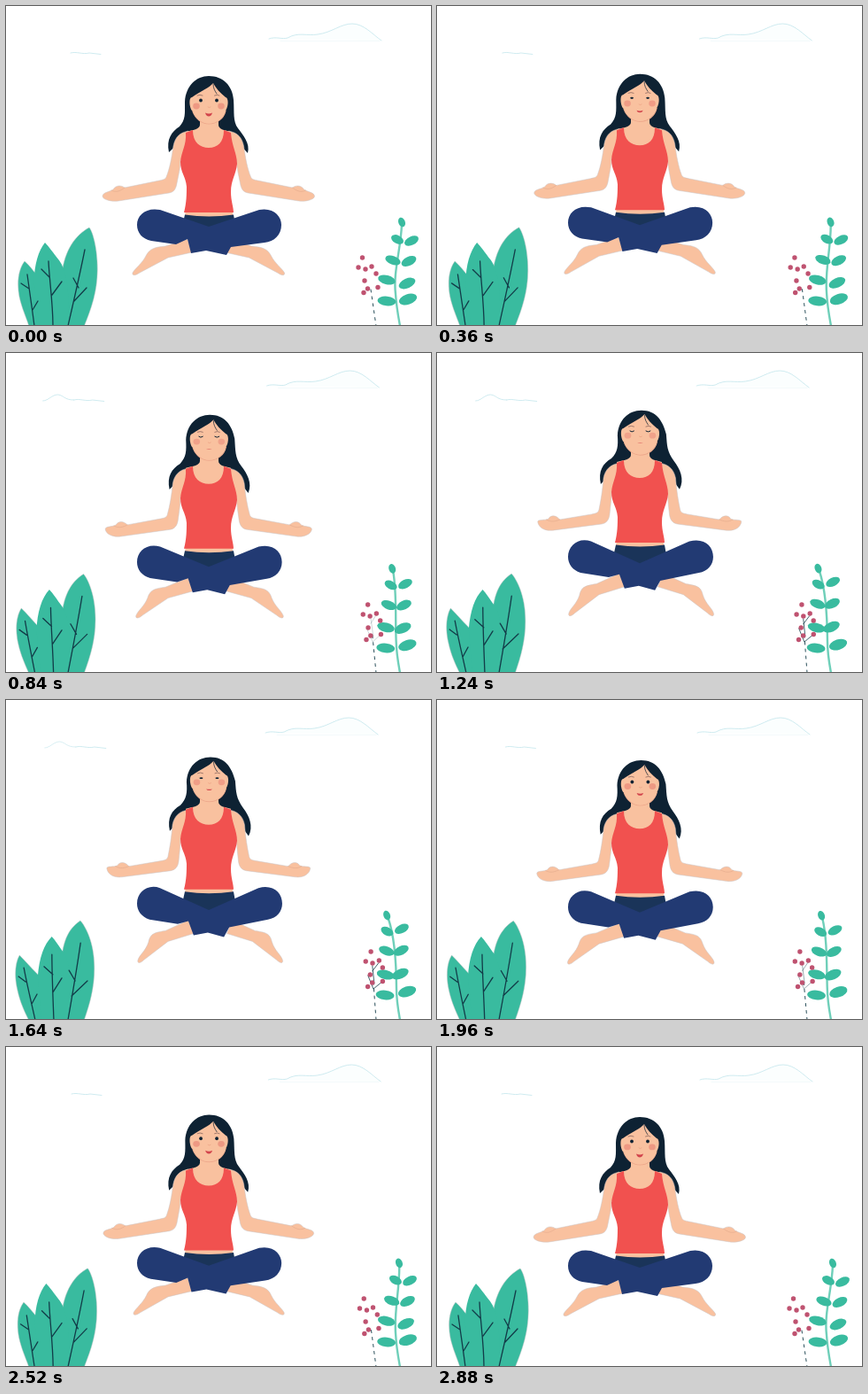
Recreate the animation shown at these times as an HTML page. Size 480 by 360 pixels, loop 2.92 s.

```html
<!DOCTYPE html>
<html lang="en">
<head>
<meta charset="utf-8">
<title>Floating meditation</title>
<style>
html, body { margin: 0; width: 100%; height: 100%; overflow: hidden; background: #fff; }
svg { display: block; width: 480px; height: 360px; }
</style>
</head>
<body>
<svg id="stage" viewBox="0 0 480 360"></svg>
<script>
const LOOP = 2920, STEP = 40;
const SKIN = '#f9c19f', HAIR = '#0e2233', RED = '#f1514f', PANTS = '#223a73',
  WAIST = '#1a3459', LEAF = '#39bb9f', VEIN = '#123c48', BERRY = '#bf5270', MIST = '#c3e6ec';
const stage = document.getElementById('stage');
const movers = [];

function add(tag, attrs, parent = stage) {
  const el = document.createElementNS('http://www.w3.org/2000/svg', tag);
  for (const k in attrs) el.setAttribute(k, attrs[k]);
  parent.appendChild(el);
  return el;
}
const group = (parent = stage) => add('g', {}, parent);
const mix = (a, b, p) => a + (b - a) * p;
const ramp = (t, a, b) => Math.min(1, Math.max(0, (t - a) / (b - a)));

// Path blending from its low pose to its high pose
function morph(low, high, attrs, parent) {
  const el = add('path', attrs, parent);
  const end = high.match(/-?[\d.]+/g).map(Number);
  movers.push(p => {
    let i = 0;
    el.setAttribute('d', low.replace(/-?[\d.]+/g, n => mix(+n, end[i++], p).toFixed(2)));
  });
  return el;
}
// Group sliding by (dx, dy) between the poses
function slide(dx, dy, parent) {
  const g = group(parent);
  movers.push(p => g.setAttribute('transform', `translate(${dx * p} ${dy * p})`));
  return g;
}
function mirrored() {
  return add('g', { transform: 'translate(457.5 0) scale(-1 1)' });
}
const fill = color => ({ fill: color });
const edged = color => ({ fill: color, stroke: '#c9c5c6', 'stroke-width': .5 });
const line = (color, width) => ({ fill: 'none', stroke: color, 'stroke-width': width,
  'stroke-linecap': 'round', 'stroke-linejoin': 'round' });

// Clouds
const farCloud = slide(-4, 0);
add('path', { d: 'M297 37C305 34 312 38 318 36C330 29 340 34 352 32C368 30 378 20 391 20C404 20 414 32 424 39Z', fill: '#fbfefe' }, farCloud);
add('path', { d: 'M297 37C305 34 312 38 318 36C330 29 340 34 352 32C368 30 378 20 391 20C404 20 414 32 424 39', ...line(MIST, .8) }, farCloud);
add('path', { d: 'M310 39.5H422', ...line('#eef8f9', .7) }, farCloud);
const nearCloud = slide(6, 0);
add('path', { d: 'M73 53C80 51 86 55 94 53L107 54.5', ...line(MIST, .8) }, nearCloud);
const cloudTail = add('path', { d: 'M38 54C44 54 48 47 55 47C62 48 62 53 73 53', ...line(MIST, .8) }, nearCloud);

// Broad leaves
morph('M94 250C79 258 66 275 63 303L60 362L88 362C96 342 105 320 103 288C102 268 97 253 94 250Z',
  'M83.500 249C69 259 63 274 62 303L58 362L88 362C95 342 102 318 99 290C97 268 87 252 83.500 249Z', edged(LEAF));
morph('M21 288C14 297 12 312 15 328C18 342 24 354 26 362L50 362C48 335 42 312 36 305C31 299 26 292 21 288Z',
  'M15 288C10 297 9 312 13 328C16 342 22 354 26 362L52 362C48 338 42 316 35 309C28 302 21 294 15 288Z', edged(LEAF));
morph('M44 267C36 277 31 295 32 315L38 362L70 362C72 330 70 300 60 287C53 278 48 271 44 267Z',
  'M52 267C43 276 38 290 36 312L40 362L72 362C76 330 74 300 66 286C60 278 56 271 52 267Z', fill(LEAF));
morph('M89 275C83 305 76 335 70 361M76 307L82 318M91 318L77 333',
  'M84 274C80 303 75 332 70 361M71 305L78 317M92 317L74 334', line(VEIN, 1.3));
morph('M48 288C49 310 53 335 53 361M40 297L49 306M63 311L52 326',
  'M52 287C52 310 53 335 54 361M43 301L53 310M63 314L53 330', line(VEIN, 1.3));
morph('M24 303C27 325 30 345 32 361M17 313L26 319M36 333L30 343',
  'M20 302C24 323 29 343 33 361M14 312L22 318M35 332L29 343', line(VEIN, 1.3));

// Sprig: low x, y, high x, y, half length, half width, tilt
morph('M447 246C446 275 437 300 440 325C441 340 443 350 445 361',
  'M431 246C439 268 441 298 441 325C441 340 443 350 445 361', line('#6fcfb9', 2.4));
[
  [447, 244, 429.5, 243, 5.5, 3.8, 70],
  [442, 263.5, 430, 261, 7.5, 4.6, 28], [458, 265, 446.5, 258, 8.5, 4.8, -26],
  [437, 287, 429.5, 283, 9, 4.9, 20], [455, 288, 446, 282.5, 9, 5, -26],
  [430, 309, 428.5, 310, 10, 5.2, 14], [453, 313, 445, 309, 10, 5.4, -24],
  [430, 333, 428, 333, 10.5, 5.4, 6], [454, 331, 453, 329, 10.5, 5.8, -18]
].forEach(([x, y, x2, y2, rx, ry, tilt]) => {
  const el = add('ellipse', { rx, ry, fill: LEAF });
  movers.push(p => el.setAttribute('transform',
    `translate(${mix(x, x2, p)} ${mix(y, y2, p)}) rotate(${tilt})`));
});

// Berries lean more the higher they sit
const lean = (y, p) => p * 10 * (360 - y) / 76;
morph('M412 320L418 361', 'M415 318L418 361', { ...line(VEIN, .9), 'stroke-dasharray': '3 5' });
const twigs = morph('M404 309L413 326L420 317M409 300L413 320M413 294L409 304',
  'M409 311L415 326L425 318M414 300L416 320M421 297L414 306', line(VEIN, .8));
[[402.5, 284], [398, 295], [406, 297], [413, 294], [418, 302], [405, 310],
  [408.5, 319], [404, 323.5], [420, 317.5]].forEach(([x, y]) => {
  const el = add('circle', { cy: y, r: 2.7, fill: BERRY });
  movers.push(p => el.setAttribute('cx', x + lean(y, p)));
});

// Hair
morph('M229 79C215 79 203 90 202 108C202 122 203 128 196 136C187 142 181 150 184 165L200 150L258 150L273 166C276 155 268 146 262 138C256 130 258 120 257 106C256 90 245 79 229 79Z',
  'M231 64C216 64 205 75 204 92C205 104 204 111 197 118C187 124 182 132 185 147L200 131L258 131L274 153C280 142 275 130 268 121C260 110 260 104 259 91C255 75 247 64 231 64Z', fill(HAIR));

// Feet and arms, drawn once and mirrored; the far foot swings in less
const sides = [group(), mirrored()];
sides.forEach((side, far) => {
  morph('M205 263L180 271C168 272 162 274 158 282C154 290 146 296 143 301C142 305 147 304 151 301L183 284L210 278Z',
    'M206 248L180 260C166 262 163 264 161 273C158 283 150 288 149 294C149 298 153 296 156 293L183 272L212 263Z',
    edged(SKIN), slide(-4 * far, 0, side));
  morph('M206 141C196 143 191 148 189 158C187 172 185 183 181 193C180 196 177 196 173 197L134 205C130 202 124 202 121 207C117 210 109 210 109 215C110 219 120 221 127 220L184 211C190 210 192 206 193 200C195 190 197 182 197 174L210 170Z',
    'M206 123C196 125 190 130 188 140C187 154 185 166 183 176C182 180 179 180 175 181L139 187C135 182 129 181 126 186C122 188 114 186 114 189C115 196 122 200 131 199L186 192C191 191 194 188 195 182C196 172 197 164 197 155L210 150Z', edged(SKIN), side);
  morph('M119 208C124 211 129 209 134 205', 'M124 187C129 190 134 189 139 187', line('#e3aa8b', .6), side);
});

// Torso
const torso = slide(0, -20);
add('path', { d: 'M219 124V134C219 139 211 140 203 142L207 170H251L254 142C246 140 240 139 240 134V124Z', ...fill(SKIN) }, torso);
add('path', { d: 'M203 228H256V238H202Z', ...fill(SKIN) }, torso);
add('path', { d: 'M203 143L211 140C211 154 219 160 229 160C239 160 246 154 246 140L254 143C255 158 261 167 261 178C260 190 254 196 254 210C254 220 257 227 257 233H201C204 222 204 212 204 204C203 192 197 188 197 176C198 164 204 157 203 143Z', ...fill(RED) }, torso);
add('path', { d: 'M202 235.500Q229 239.500 257 235.500L261 258H197Z', ...fill(WAIST) }, torso);

// Legs
morph('M174 230L229 249L286 230C302 227 311 237 311 247C311 258 303 266 292 267L254 272L249 281L226 276L209 279L205 263L192 269L164 265C154 263 148 256 148 247C148 236 158 227 174 230Z',
  'M174 211.500L229 236.500L285 211.500C302 207 312 217 312 229C312 238 306 245 296 247L252 256L246 267L228 262L212 265L206 249L194 252L162 247C153 244 148 237 148 229C148 216 160 206.500 174 211.500Z', fill(PANTS));

// Face
const head = slide(.5, -19);
add('path', { d: 'M211 119C214 127 221 133 229 133C238 133 246 127 248 118', ...line('#eeaa8d', 1.2) }, head);
add('path', { d: 'M234 87C230 92 220 96 210 103C206 103 207 116 211 119C214 127 221 132.5 229 132.5C238 132.5 246 127 248 118C252 112 251 103 248 103C242 98 237 93 234 87Z', ...fill(SKIN) }, head);
add('path', { d: 'M234 88C234 93 236 96 238 99', ...line(HAIR, .7) }, head);
add('path', { d: 'M216 101Q219 99.500 222 101M235.500 101Q238.500 99.500 241 101', ...line('#7c5a55', .7) }, head);
const openEyes = group(head);
const shutEyes = add('path', { d: 'M217.500 106Q219.500 108 222 106M235.500 106Q238 108 240.500 106', ...line(HAIR, 1) }, head);
const eyes = [220, 238].map(cx => add('ellipse', { cx, cy: 106.5, rx: 1.9, fill: HAIR }, openEyes));

const lower = slide(.5, -21);
const cheeks = [215, 243].map(cx => add('ellipse', { cx, cy: 113, rx: 3.8, ry: 3.4, fill: '#ea8878' }, lower));
add('path', { d: 'M228 114Q229.500 115.500 231 114', ...line('#eda587', .8) }, lower);
const mouth = add('path', { d: 'M-4 -1Q0 1 4 -1Q3 3 0 3Q-3 3 -4 -1Z', fill: '#d2444c' }, lower);

function draw(now) {
  const t = Math.floor(now % LOOP / STEP) * STEP;
  const p = (1 - Math.cos(2 * Math.PI * t / LOOP)) / 2;
  movers.forEach(move => move(p));

  const shut = ramp(t, 240, 520) - ramp(t, 1520, 1800);
  eyes.forEach(eye => eye.setAttribute('ry', 2 * (1 - shut)));
  openEyes.setAttribute('opacity', shut > .9 ? 0 : 1);
  shutEyes.setAttribute('opacity', ramp(shut, .5, 1));
  cheeks.forEach(c => c.setAttribute('opacity', .7 - .15 * shut));

  const smile = (1 - .75 * shut) * (1 - .35 * p);
  mouth.setAttribute('transform',
    `translate(229 ${121.5 - .5 * p}) scale(${mix(.75, 1, smile)} ${smile})`);
  twigs.setAttribute('opacity', ramp(p, .5, .95));
  cloudTail.setAttribute('opacity', ramp(t, 560, 760) - ramp(t, 1600, 1800));
}
function tick() {
  draw(performance.now());
  requestAnimationFrame(tick);
}
tick();
</script>
</body>
</html>
```
